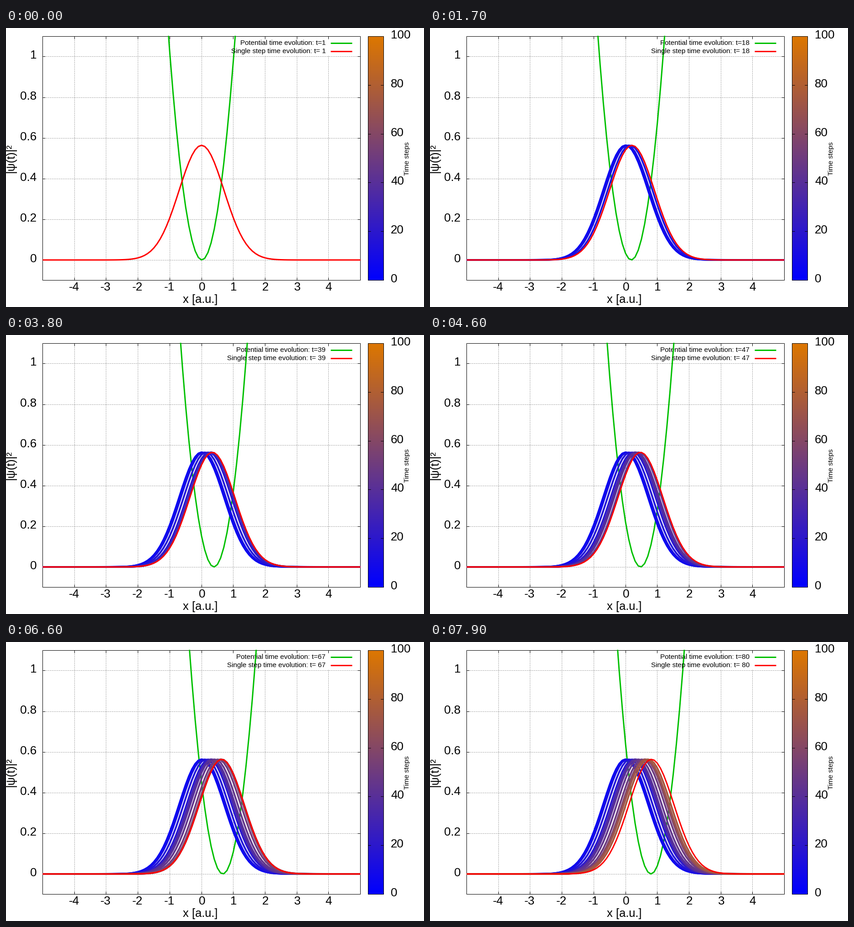
Animation, 917 px wide and 611 px high, one loop 8000 ms. Source, as a matplotlib script:

```python
import matplotlib.pyplot as plt
import numpy as np
from matplotlib.animation import FuncAnimation
from matplotlib.patches import Rectangle

W, H, DPI = 917, 611, 100
STEPS, INTERVAL, STRIDE = 80, 100, 5
PX = 72 / DPI                                # one pixel in points
LEFT, RIGHT, TOP, BOTTOM = 80.5, 777.5, 18.5, 552.5
BAR_L, BAR_R = 794.5, 828.5
LOW, HIGH = np.array([0, 0, 255]) / 255, np.array([221, 119, 0]) / 255
GREEN, RED = "#00c000", "#ff0000"
BIG, SMALL = 26, 15.3
TIC = 6

plt.rcParams["font.family"] = "Liberation Sans"
plt.rcParams["path.simplify"] = False
plt.rcParams["path.snap"] = False

fig = plt.figure(figsize=(W / DPI, H / DPI), dpi=DPI, facecolor="white")
ax = fig.add_axes([0, 0, 1, 1])
ax.axis("off")


def px(x):
    return LEFT + (x + 5) / 10 * (RIGHT - LEFT)


def py(y):
    return BOTTOM - (y + 0.1) / 1.2 * (BOTTOM - TOP)


def seg(xs, ys, color="black", width=1, z=1, **kw):
    kw.setdefault("solid_capstyle", "butt")
    return ax.plot(xs, ys, color=color, lw=width * PX, zorder=z, **kw)[0]


def label(x, y, s, size=BIG, ha="center", z=8, **kw):
    return ax.text(x, y, s, fontsize=size * PX, ha=ha, va="baseline",
                   zorder=z, **kw)


def frame(x0, x1):
    ax.add_patch(Rectangle((x0, TOP), x1 - x0, BOTTOM - TOP, fill=False,
                           ec="black", lw=PX, zorder=2))


def side_tics(x0, x1, y):
    seg([x0, x0 + TIC], [y, y], z=2)
    seg([x1 - TIC, x1], [y, y], z=2)


# Grid, tics and tic labels
dots = dict(color="#8c8c8c", linestyle=(0, (2, 2)), dash_capstyle="butt")
for v in range(-4, 5):
    x = np.floor(px(v)) + 0.5
    seg([x, x], [BOTTOM, 60 if v >= 1 else TOP], **dots)
    seg([x, x], [BOTTOM, BOTTOM - TIC], z=2)
    seg([x, x], [TOP, TOP + TIC], z=2)
    label(x - (1.5 if v < 0 else -0.5), 575, str(v))
for i in range(6):
    y = np.floor(py(i / 5)) + 0.5
    seg([LEFT, RIGHT], [y, y], **dots)
    side_tics(LEFT, RIGHT, y)
    label(67.5, y + 4.5, f"{i / 5:g}", ha="right")
frame(LEFT, RIGHT)
label(426, 602, "x [a.u.]", 25.5)
label(17.5, 285, "|ψ(t)|²", 25.5, rotation=90, rotation_mode="anchor")

# Colour bar
ramp = np.linspace(1, 0, 256)[:, None, None]
ax.imshow(LOW + ramp * (HIGH - LOW), extent=(BAR_L, BAR_R, BOTTOM, TOP),
          aspect="auto", interpolation="bilinear", zorder=1)
frame(BAR_L, BAR_R)
for v in range(0, 101, 20):
    y = np.floor(BOTTOM - v / 100 * (BOTTOM - TOP)) + 0.5
    side_tics(BAR_L, BAR_R, y)
    label(844, y + 4.5, str(v), ha="left")
label(884, 286, "Time steps", SMALL, rotation=90, rotation_mode="anchor")

# Curves
grid = np.linspace(-5, 5, 101)
clip = Rectangle((LEFT - 0.5, TOP - 1.5), RIGHT - LEFT + 1, BOTTOM - TOP + 2,
                 transform=ax.transData)


def potential(t):
    return py((grid - 0.01 * t) ** 2)


def density(t):
    # ground state dragged along by a harmonic trap of constant speed
    centre = 0.01 * t - 0.05 * np.sin(0.2 * t)
    return py(np.exp(-(grid - centre) ** 2) / np.sqrt(np.pi))


def curve(ys, color, z, width=3):
    line = seg(px(grid), ys, color, width, z, solid_joinstyle="round")
    line.set_clip_path(clip)
    return line


trail = [(s, curve(density(s), LOW + s / 100 * (HIGH - LOW), 5 + s / 1000, 4))
         for s in range(0, STEPS, STRIDE)]
well = curve(potential(1), GREEN, 4)
wave = curve(density(1), RED, 7)

# Legend
seg([712.5, 759.5], [33.5, 33.5], GREEN, 3, 4)
seg([712.5, 759.5], [51.5, 51.5], RED, 3, 7)
well_key = label(701, 37, "", SMALL, "right", 3)
wave_key = label(701.5, 55, "", SMALL, "right", 6)

ax.set_xlim(0, W)
ax.set_ylim(H, 0)


def draw(i):
    t = i + 1
    for s, line in trail:
        line.set_visible(0 < i and s <= t)
    well.set_ydata(potential(t))
    wave.set_ydata(density(t))
    well_key.set_text(f"Potential time evolution: t={t}")
    wave_key.set_text(f"Single step time evolution: t= {t}")
    return [well, wave, well_key, wave_key] + [line for _, line in trail]


anim = FuncAnimation(fig, draw, frames=STEPS, interval=INTERVAL,
                     repeat=True, repeat_delay=0, blit=False)
plt.show()
```
